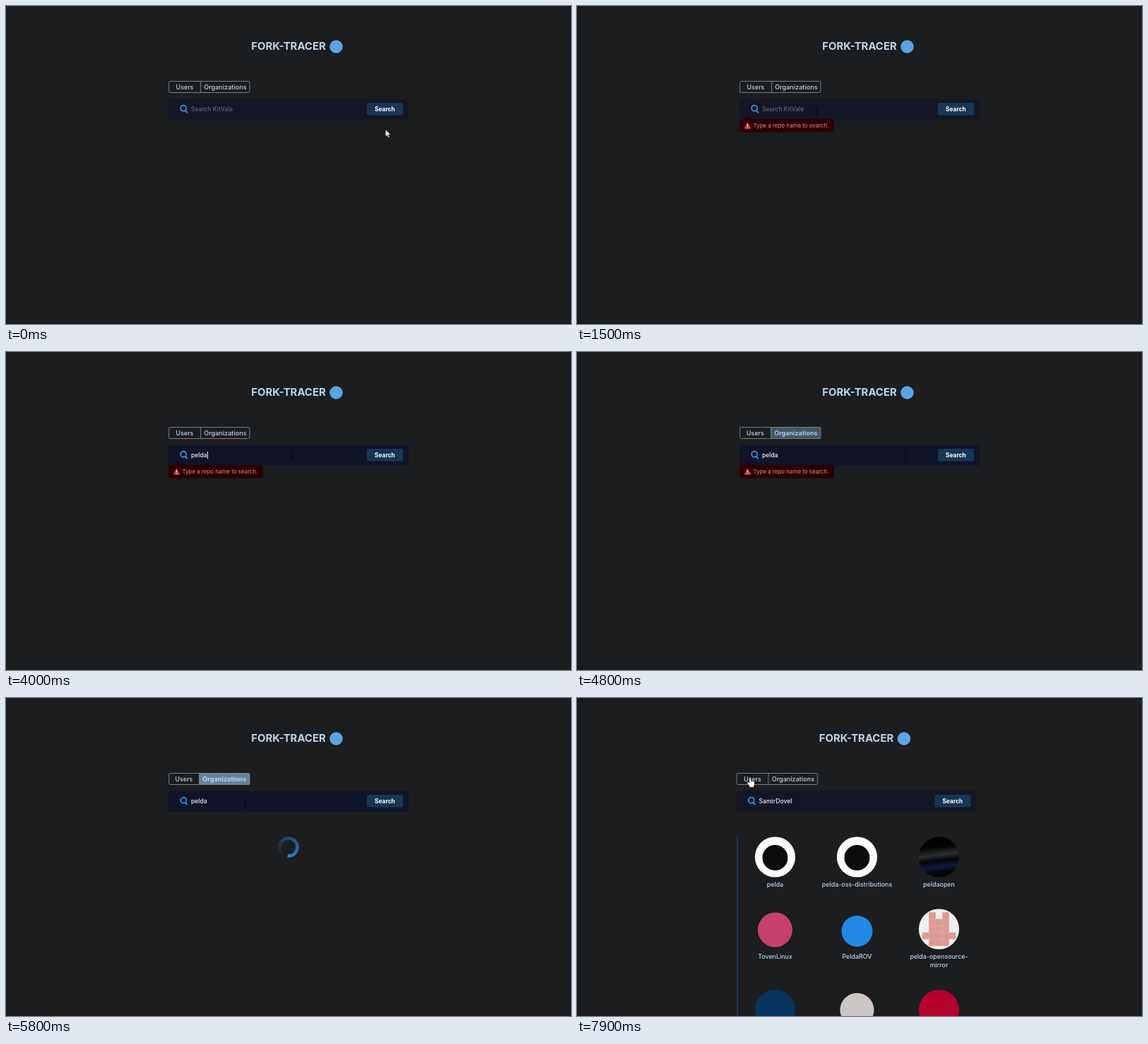
Recreate the animation shown at these times as an HTML page. Size 800x450 px, loop 8000 ms.

```html
<!DOCTYPE html>
<html lang="en">
<head>
<meta charset="utf-8">
<title>Search</title>
<style>
  html, body { margin: 0; width: 100%; height: 100%; overflow: hidden; background: #1c1d1e; }
  svg { position: absolute; left: 0; top: 0; font: 500 9px Inter, "Open Sans", sans-serif; }
  svg * { pointer-events: none; }
  [data-cursor] { pointer-events: all; }
  .mid { text-anchor: middle; }
  .pale { fill: #b9d6ee; }
  .title { font-size: 14.9px; font-weight: 700; }

  #page { animation: shift 8s step-end infinite; }
  #results { animation: results 8s step-end infinite; }
  #tip { animation: tip 8s step-end infinite; }
  #bar { animation: bar 8s linear infinite; }
  #org { animation: org 8s linear infinite; }
  #divider, #userLabel { animation: nudge 8s linear infinite; --by: -2px; }
  #userLabel { --by: -1px; }
  #orgLabel { animation: nudge 8s linear infinite, bold 8s linear infinite; --by: -1px; }
  #cursor { animation: move 8s ease-in-out infinite; }

  #spinner {
    position: absolute; left: 385px; top: 196px; width: 30px; height: 30px; border-radius: 50%;
    background: conic-gradient(#3080ca00 25deg, #3080ca 360deg);
    -webkit-mask: radial-gradient(circle, transparent 10px, #000 10.6px);
    mask: radial-gradient(circle, transparent 10px, #000 10.6px);
    animation: spin 1s linear -.715s infinite, load 8s step-end infinite;
  }

  @keyframes spin { from { transform: rotate(0deg); } to { transform: rotate(360deg); } }
  @keyframes load { 0% { visibility: hidden; } 66.25% { visibility: visible; } 77.5%, 100% { visibility: hidden; } }
  @keyframes results { 0% { visibility: hidden; } 77.5%, 100% { visibility: visible; } }
  @keyframes shift { 0% { transform: none; } 77.5%, 100% { transform: translateX(-4.5px); } }
  @keyframes tip { 0% { visibility: hidden; } 12.5% { visibility: visible; } 66.25%, 100% { visibility: hidden; } }
  @keyframes bar {
    0%, 20% { fill: #141625; }
    25%, 90% { fill: #0f1429; }
    94%, 100% { fill: #141626; }
  }
  @keyframes org {
    0%, 57.5% { x: 275.5px; width: 69.5px; fill: #66839d00; }
    62%, 93.1% { x: 273.5px; width: 71.5px; fill: #66839d; }
    97.5%, 100% { x: 275.5px; width: 69.5px; fill: #66839d00; }
  }
  @keyframes nudge {
    0%, 57.5%, 97.5%, 100% { transform: none; }
    62%, 93.1% { transform: translateX(var(--by)); }
  }
  @keyframes bold {
    0%, 57.5%, 97.5%, 100% { font-weight: 500; }
    62%, 93.1% { font-weight: 650; }
  }
  @keyframes move {
    0%, 5% { transform: translate(537.5px, 175px); }
    10.6%, 12.5% { transform: translate(538px, 147px); }
    17.5%, 25% { transform: translate(339px, 149.5px); }
    32.5%, 36.25% { transform: translate(541px, 183px); }
    38.75% { transform: translate(515px, 159.5px); }
    43.75%, 48.75% { transform: translate(420px, 150px); }
    53.75%, 57.5% { transform: translate(312px, 115px); }
    60% { transform: translate(466px, 146px); }
    62.5%, 66.25% { transform: translate(538px, 147px); }
    70.6%, 89.4% { transform: translate(338.5px, 151px); }
    91.9%, 93.75% { transform: translate(312px, 114px); }
    96.9%, 100% { transform: translate(245px, 113px); }
  }
</style>
</head>
<body>
<svg width="800" height="450" viewBox="0 0 800 450">
  <defs>
    <linearGradient id="photo" x1="0" y1="0" x2=".12" y2="1">
      <stop offset=".3" stop-color="#030304"/>
      <stop offset=".5" stop-color="#2c2d2f"/>
      <stop offset=".64" stop-color="#050608"/>
      <stop offset=".8" stop-color="#0b1c42"/>
      <stop offset=".92" stop-color="#040507"/>
    </linearGradient>
  </defs>

  <g id="page">
    <text class="mid pale title" x="400" y="62.4">FORK-TRACER</text>
    <circle cx="467.5" cy="57.5" r="9.3" fill="#5ba4e4"/>

    <!-- tabs -->
    <rect id="org" x="275.5" y="106.5" width="69.5" height="16" rx="1.5"/>
    <path id="divider" d="M275.7 106.5v16" stroke="#808b96" stroke-width=".9"/>
    <rect data-cursor="hand" x="230.7" y="106.5" width="114.3" height="16" rx="2" fill="none" stroke="#808b96" stroke-width=".9"/>
    <text id="userLabel" class="mid pale" x="253" y="117.5" font-size="8.9">Users</text>
    <text id="orgLabel" class="mid pale" x="310.4" y="117.5" font-size="9.1">Organizations</text>

    <!-- search bar -->
    <rect id="bar" data-cursor="text" x="230" y="131.5" width="340" height="29.5" rx="2"/>
    <g fill="none" stroke="#3d94dc" stroke-linecap="round">
      <circle cx="251.3" cy="144.7" r="4" stroke-width="1.7"/>
      <path d="M254.2 148.2l2.2 2.4" stroke-width="1.9"/>
    </g>
    <text id="hint" x="262" y="149" font-size="8.5" fill="#62656f">Search KitVale</text>
    <text id="query" x="262" y="149" font-size="8.6" fill="#eef2f6"></text>
    <rect id="caret" y="141" width=".9" height="10" fill="#fff"/>
    <rect data-cursor="hand" x="511" y="137" width="51" height="17.5" rx="2" fill="#173656"/>
    <text class="mid" x="536.4" y="149" font-size="8.4" font-weight="700" fill="#fff">Search</text>

    <g id="tip">
      <path d="M236 160.5l6-6 6 6z" fill="#2b0003"/>
      <rect x="230" y="160" width="134" height="18.5" rx="3.5" fill="#2b0003"/>
      <path d="M241.6 165.2l4.2 8h-8.4z" fill="#cb4054" stroke="#cb4054" stroke-linejoin="round"/>
      <path d="M241.6 167.5v2.8m0 1.2v1" stroke="#fff" stroke-width=".9"/>
      <text x="249.5" y="172" font-size="7.95" font-weight="400" fill="#e8858c">Type a repo name to search.</text>
    </g>

    <g id="results" transform="translate(4.5 0)">
      <rect x="226" y="196" width="2" height="260" rx="1" fill="#1a3550"/>
      <g id="cards"></g>
    </g>
  </g>

  <g id="cursor">
    <path data-kind="arrow" d="M0 0v9.8l2.3-2.1 1.6 3.5 1.6-.7-1.5-3.4h3z" fill="#fff" stroke="#111" stroke-width=".5"/>
    <path data-kind="text" d="M-1.6-5q1.6 0 1.6 1.2q0-1.2 1.6-1.2M0-4v8M-1.6 5q1.6 0 1.6-1.2q0 1.2 1.6 1.2" fill="none" stroke="#050608" stroke-width=".9"/>
    <path data-kind="hand" d="M-1 .8q0-1.3 1.1-1.3t1.1 1.3v3.6q1.6-.6 2 .4q1.3-.5 1.7.6q1.4-.2 1.4 1.3v2.4q0 1.6-1.1 2.7v1.4h-5.8v-1.1l-3.1-4.2q-1-1.6.2-2t2.5 1.4z" fill="#fff" stroke="#111" stroke-width=".5"/>
  </g>
</svg>
<div id="spinner"></div>

<script>
  const $ = id => document.getElementById(id);
  const LOOP = 8000;

  // avatars
  const disc = (x, y, r, fill) => `<circle cx="${x}" cy="${y}" r="${r}" fill="${fill}"/>`;
  const badge = (x, y) => disc(x, y, 28.6, '#fdfdfa') + disc(x, y + 1, 18, '#0b0b09');
  const blocks = (x, y) => disc(x, y, 28.6, '#efefee') +
    ['01010', '01110', '01110', '11111', '01110'].map((row, j) =>
      [...row].map((on, i) => on === '1'
        ? `<rect x="${x - 23.75 + i * 9.5}" y="${y - 23.75 + j * 9.5}" width="9.6" height="9.6" fill="#dc9b92"/>`
        : '').join('')).join('');
  const plain = (r, fill, dy = 0) => (x, y) => disc(x, y + dy, r, fill);

  const cards = [
    [badge, 'pelda'], [badge, 'pelda-oss-distributions'], [plain(28.6, 'url(#photo)'), 'peldaopen'],
    [plain(24.5, '#c4416b', 1), 'TovenLinux'], [plain(22, '#2189e4', 3), 'PeldaROV'], [blocks, 'pelda-opensource-', 'mirror'],
    [plain(28.6, '#07345e')], [plain(24, '#cbc6c4')], [plain(28.6, '#b4022f')]
  ];
  const rowY = [225, 327, 441.5];
  const nameY = [267, 368.7];

  $('cards').innerHTML = cards.map(([draw, ...lines], i) => {
    const x = 280.5 + (i % 3) * 116, row = Math.floor(i / 3);
    return draw(x, rowY[row]) + lines.map((s, k) =>
      `<text class="mid pale" x="${x}" y="${nameY[row] + k * 12}" font-size="8.9">${s}</text>`).join('');
  }).join('');

  // typing: [start, ms per letter, text]
  const typing = [[1900, 120, 'pelda'], [6680, 50, 'SamirDovel']];

  function queryAt(t) {
    const run = typing.filter(([start]) => t >= start).pop();
    return run ? run[2].slice(0, 1 + Math.floor((t - run[0]) / run[1])) : '';
  }

  const focused = t => (t > 1450 && t < 4600) || (t > 6650 && t < 7450);
  const cursor = $('cursor');
  let origin;

  function frame(now) {
    origin ??= now;
    const t = (now - origin) % LOOP;
    const text = queryAt(t);
    if ($('query').textContent !== text) $('query').textContent = text;
    $('hint').style.display = text ? 'none' : '';
    const blink = t % 1000 < 500 && text;
    $('caret').style.display = focused(t) && blink ? '' : 'none';
    $('caret').setAttribute('x', 262.3 + (text ? $('query').getComputedTextLength() : 0));

    const { e, f } = new DOMMatrix(getComputedStyle(cursor).transform);
    const kind = document.elementFromPoint(e, f)?.dataset.cursor || 'arrow';
    for (const shape of cursor.children)
      shape.style.display = shape.dataset.kind === kind ? '' : 'none';
    requestAnimationFrame(frame);
  }
  requestAnimationFrame(frame);
</script>
</body>
</html>
```
